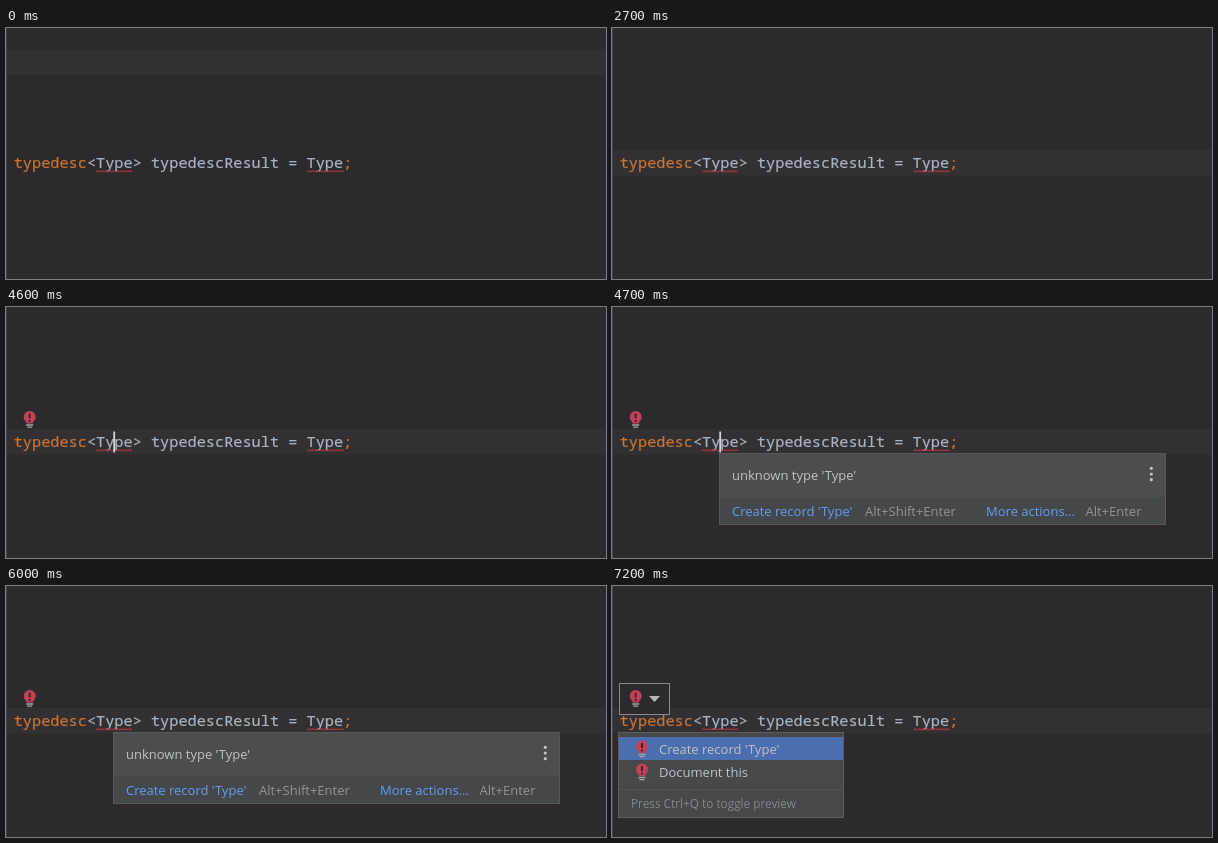
Animation, 600 px wide and 251 px high, one loop 8000 ms. Source, as an HTML page:

```html
<!DOCTYPE html>
<html lang="en">
<head>
<meta charset="utf-8">
<title>Code editor quick fix</title>
<style>
  html, body { margin: 0; width: 100%; height: 100%; overflow: hidden; background: #2c2a2c; }
  svg { display: block; width: 600px; height: 251px; }
  .code { font: 15.25px "Noto Sans Mono", "DejaVu Sans Mono", monospace; fill: #a9b4c2; stroke: #a9b4c2; stroke-width: .2; }
  .key { fill: #c87535; stroke: #c87535; }
  .ui { font: 13px "Open Sans", "Noto Sans", sans-serif; fill: #c0c2c4; }
  .link { fill: #659cf0; }
  .dim { fill: #929496; }
  .wave { fill: none; stroke: #a8343f; stroke-width: 1.2; }
</style>
</head>
<body>
<svg viewBox="0 0 600 251">
  <defs>
    <g id="bulb">
      <path d="M-3 5C-3 3-6 2-6-1.5a6 6 0 0 1 12 0C6 2 3 3 3 5Z" fill="#c4405a"/>
      <path d="M0-5V0M0 1.6V3.4" stroke="#30282b" stroke-width="1.9"/>
      <path d="M-3.5 6.5h7M-2.5 8.7h5" stroke="#a2a4a6" stroke-width="1.3"/>
    </g>
    <path id="wave" class="wave"/>
  </defs>

  <rect width="600" height="251" fill="#2c2a2c"/>
  <rect id="line" x="1" width="599" height="25.5" fill="#323033"/>
  <path d="M.5 0V251" stroke="#454345"/>

  <text class="code" x="7.7" y="139.8"><tspan class="key">typedesc</tspan>&lt;Type&gt; typedescResult = Type<tspan class="key">;</tspan></text>
  <use href="#wave" x="90"/>
  <use href="#wave" x="301.5"/>
  <rect id="caret" x="107.3" y="124.5" width="1.8" height="21" fill="#d4d4d4"/>

  <g id="button">
    <rect x="7.5" y="97.5" width="50" height="31" fill="#2c2a2c" stroke="#87898a"/>
    <path d="M37 110h11l-5.5 6Z" fill="#b4b6b8"/>
  </g>
  <use id="mark" href="#bulb" x="23.7" y="111.5"/>

  <g id="hint" class="ui">
    <rect x="107.5" y="146.5" width="446" height="71" fill="#4b4d4e" stroke="#56585a"/>
    <rect x="108" y="190" width="445" height="27" fill="#45484a"/>
    <text x="120" y="173">unknown type 'Type'</text>
    <circle cx="539.3" cy="161.3" r="1.6"/>
    <circle cx="539.3" cy="167" r="1.6"/>
    <circle cx="539.3" cy="172.7" r="1.6"/>
    <text class="link" x="120" y="208.7">Create record 'Type'</text>
    <text class="dim" x="253" y="208.7">Alt+Shift+Enter</text>
    <text class="link" x="374" y="208.7">More actions...</text>
    <text class="dim" x="473.5" y="208.7">Alt+Enter</text>
  </g>

  <g id="menu" class="ui">
    <rect x="6.5" y="146.5" width="225" height="85" fill="#46484a" stroke="#5c5e60"/>
    <rect x="7" y="151" width="224" height="23" fill="#4b6eaf"/>
    <path d="M7 203.5H231" stroke="#505254"/>
    <use href="#bulb" x="30" y="162"/>
    <use href="#bulb" x="30" y="185"/>
    <text x="47" y="167.5">Create record 'Type'</text>
    <text x="47" y="190.5">Document this</text>
    <text class="dim" x="19" y="222" style="font-size:11.8px;fill:#858789">Press Ctrl+Q to toggle preview</text>
  </g>
</svg>
<script>
  const LOOP = 8000;
  const $ = id => document.getElementById(id);

  // Visible periods in ms
  const shown = {
    caret: [[800, 2700], [3300, 3800], [4300, 4900], [5500, 6000], [6500, 6900]],
    mark: [[3000, LOOP]],
    hint: [[4700, 6100]],
    button: [[6300, LOOP]],
    menu: [[6800, LOOP]]
  };

  let wave = "M0 143.9";
  for (let i = 0; i < 9; i++) wave += "l2-1.2l2 1.2";
  $("wave").setAttribute("d", wave);

  function draw(now) {
    const t = now % LOOP;
    for (const id in shown) {
      const on = shown[id].some(([from, to]) => t >= from && t < to);
      $(id).style.display = on ? "" : "none";
    }
    $("line").setAttribute("y", t < 800 ? 21.5 : 122);
    requestAnimationFrame(draw);
  }
  draw(0);
</script>
</body>
</html>
```
